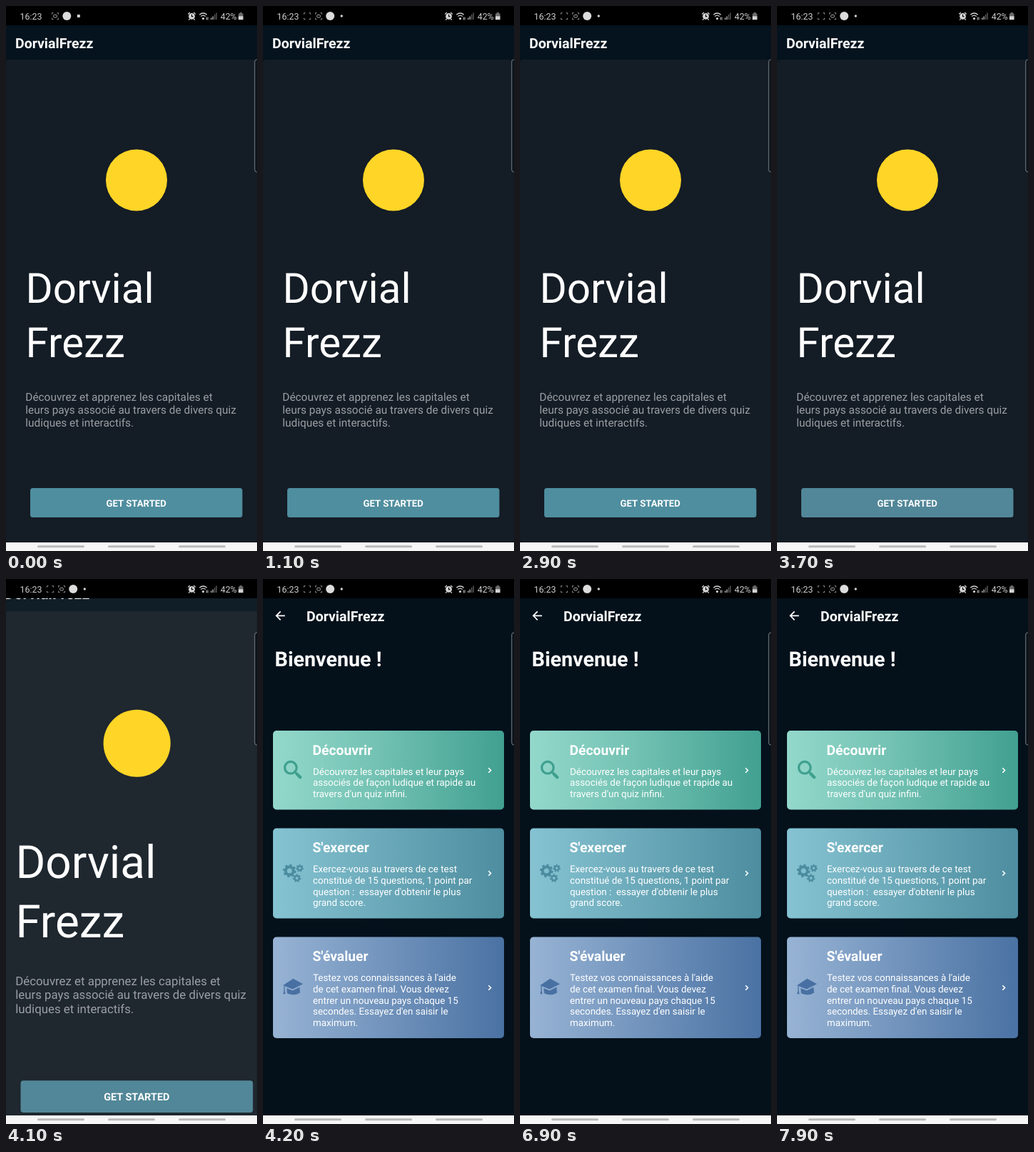
Write an HTML page that moves like this. It is 352 px wide and 762 px high and loops after 8000 ms.

```html
<!DOCTYPE html>
<html lang="fr">
<head>
<meta charset="utf-8">
<title>DorvialFrezz</title>
<style>
  html, body { margin: 0; width: 100%; height: 100%; overflow: hidden; background: #04111b; }
  svg { display: block; width: 100%; height: 100%; }
  text { font-family: Roboto, Arial, sans-serif; fill: #fff; text-rendering: geometricPrecision; }

  .bar { font-size: 19.5px; font-weight: 700; }
  .hero { font-size: 58.3px; }
  .lead { font-size: 15.4px; fill: #9b9fa5; }
  .cta { font-size: 13.2px; font-weight: 700; text-anchor: middle; }
  .hello { font-size: 28.7px; font-weight: 700; }
  .name { font-size: 19.3px; font-weight: 700; }
  .desc { font-size: 13.4px; }
  .clock { font-size: 12.4px; fill: #d0d0d0; }

  .home, .veil, .button, .before, .after { animation: 8s linear infinite; }
  .home { transform-origin: 176px 388px; animation-name: zoom; }
  .veil { opacity: 0; animation-name: veil; }
  .button { fill: #4f8e9f; animation-name: press; }
  .menu { animation: show 8s step-end infinite; }
  .before { animation-name: early; animation-timing-function: step-end; }
  .after { animation-name: late; animation-timing-function: step-end; }

  @keyframes zoom {
    0% { transform: scale(1); }
    48.375% { transform: scale(1); animation-timing-function: cubic-bezier(.35, .45, 0, 1); }
    53.375%, 100% { transform: scale(1.1); }
  }
  @keyframes veil {
    0%, 48.375% { opacity: 0; }
    51.25%, 100% { opacity: .047; }
  }
  @keyframes press {
    0%, 46.2% { fill: #4f8e9f; }
    46.25%, 100% { fill: #518798; }
  }
  @keyframes show { 0% { visibility: hidden; } 52.3%, 100% { visibility: visible; } }
  @keyframes early { 0% { visibility: visible; } 1.25%, 100% { visibility: hidden; } }
  @keyframes late { 0% { visibility: hidden; } 1.25%, 100% { visibility: visible; } }
</style>
</head>
<body>
<svg viewBox="0 0 352 762" preserveAspectRatio="none">
  <defs>
    <linearGradient id="green"><stop stop-color="#93d8cb"/><stop offset=".45" stop-color="#73c2b3"/><stop offset="1" stop-color="#41a091"/></linearGradient>
    <linearGradient id="teal"><stop stop-color="#86c3d2"/><stop offset="1" stop-color="#4d8d9f"/></linearGradient>
    <linearGradient id="blue"><stop stop-color="#97b3d4"/><stop offset="1" stop-color="#4a72a3"/></linearGradient>
    <path id="corners" d="M-4.5-2.5v-2h2M2.5-4.5h2v2M4.5 2.5v2h-2M-2.5 4.5h-2v-2" fill="none" stroke="#8f8f8f"/>
    <g id="capture">
      <use href="#corners"/>
      <rect x="-2.3" y="-1.8" width="4.6" height="3.6" rx=".8" fill="none" stroke="#a8a8a8"/>
    </g>
    <path id="chevron" d="M316.3-3.2l3.2 3.2l-3.2 3.2" fill="none" stroke="#fff" stroke-width="1.6"/>
  </defs>

  <!-- welcome screen -->
  <g class="home">
    <rect y="27" width="352" height="723" fill="#04131d"/>
    <rect y="75" width="352" height="675" rx="4" fill="#141c25"/>
    <rect class="veil" y="27" width="352" height="723" fill="#f0ffff"/>
    <text class="bar" x="13" y="59">DorvialFrezz</text>
    <circle cx="183" cy="243.5" r="43" fill="#ffd527"/>
    <text class="hero" x="27.5" y="415">Dorvial</text>
    <text class="hero" x="27.5" y="491">Frezz</text>
    <text class="lead">
      <tspan x="27.3" y="552.4">Découvrez et apprenez les capitales et</tspan>
      <tspan x="27.3" y="570.2">leurs pays associé au travers de divers quiz</tspan>
      <tspan x="27.3" y="588">ludiques et interactifs.</tspan>
    </text>
    <rect class="button" x="34" y="674" width="297.5" height="41" rx="3.5"/>
    <text class="cta" x="182.7" y="699.7">GET STARTED</text>
  </g>

  <!-- menu screen -->
  <g class="menu">
    <rect y="27" width="352" height="723" fill="#04111b"/>
    <path d="M30.8 51.3H18.8M24.6 45.3l-6 6l6 6" fill="none" stroke="#fff" stroke-width="1.7"/>
    <text class="bar" x="61" y="59">DorvialFrezz</text>
    <text class="hello" x="16.6" y="122">Bienvenue !</text>

    <rect x="14" y="212" width="324" height="110.5" rx="5" fill="url(#green)"/>
    <g fill="none" stroke="#3fa08f">
      <circle cx="38.8" cy="263.7" r="8.3" stroke-width="3.2"/>
      <path d="M45 270l2.5 2.5" stroke-width="2.5"/>
      <path d="M47.5 272.5l4.7 4.7" stroke-width="4.4" stroke-linecap="round"/>
    </g>
    <text class="name" x="69.5" y="245.8">Découvrir</text>
    <text class="desc">
      <tspan x="70" y="273.7">Découvrez les capitales et leur pays</tspan>
      <tspan x="70" y="289.4">associés de façon ludique et rapide au</tspan>
      <tspan x="70" y="305">travers d'un quiz infini.</tspan>
    </text>
    <use href="#chevron" y="267.5"/>

    <rect x="14" y="348.5" width="324" height="126" rx="5" fill="url(#teal)"/>
    <g fill="none" stroke="#4b8c9f">
      <circle cx="37.2" cy="408" r="5.5" stroke-width="4"/>
      <circle cx="37.2" cy="408" r="8" stroke-width="2.6" pathLength="16" stroke-dasharray="1"/>
      <circle cx="51.5" cy="404.3" r="2.9" stroke-width="2.2"/>
      <circle cx="51.5" cy="404.3" r="4.6" stroke-width="1.6" pathLength="14" stroke-dasharray="1"/>
      <circle cx="47.6" cy="418.2" r="3.2" stroke-width="2.4"/>
      <circle cx="47.6" cy="418.2" r="5" stroke-width="1.6" pathLength="14" stroke-dasharray="1"/>
    </g>
    <text class="name" x="69.5" y="382.4">S'exercer</text>
    <text class="desc">
      <tspan x="70" y="410.2">Exercez-vous au travers de ce test</tspan>
      <tspan x="70" y="425.9">constitué de 15 questions, 1 point par</tspan>
      <tspan x="70" y="441.5">question :&nbsp; essayer d'obtenir le plus</tspan>
      <tspan x="70" y="457.2">grand score.</tspan>
    </text>
    <use href="#chevron" y="411.5"/>

    <rect x="14" y="500.5" width="324" height="141.5" rx="5" fill="url(#blue)"/>
    <g fill="#4870a2">
      <path d="M28 568.2L42.3 558.8L56 566.2L41.5 573.5Z"/>
      <path d="M33.3 572.2L41.6 575.6L51.3 570.8L52 578.5Q43.5 583.8 33.8 579.3Z"/>
      <path d="M29.2 569.5h1.3v6.2l1 4.6h-3.2l.9-4.6Z"/>
    </g>
    <text class="name" x="69.5" y="534.3">S'évaluer</text>
    <text class="desc">
      <tspan x="70" y="562.2">Testez vos connaissances à l'aide</tspan>
      <tspan x="70" y="577.9">de cet examen final. Vous devez</tspan>
      <tspan x="70" y="593.5">entrer un nouveau pays chaque 15</tspan>
      <tspan x="70" y="609.2">secondes. Essayez d'en saisir le</tspan>
      <tspan x="70" y="624.8">maximum.</tspan>
    </text>
    <use href="#chevron" y="571.5"/>
  </g>

  <!-- edge handle -->
  <rect x="348.8" y="75" width="8" height="157" rx="3" fill="#0b131b" stroke="#7d8288"/>

  <!-- status bar -->
  <rect width="352" height="27" fill="#000"/>
  <text class="clock" x="19.5" y="18.7">16:23</text>
  <g class="before">
    <use href="#capture" x="69" y="14.2"/>
    <circle cx="85.3" cy="14" r="6" fill="#dcdcdc"/>
    <rect x="99.8" y="12" width="4" height="4" fill="#d0d0d0"/>
  </g>
  <g class="after">
    <use href="#corners" x="62" y="14.2"/>
    <use href="#capture" x="78" y="14.2"/>
    <circle cx="94.2" cy="14" r="6" fill="#dcdcdc"/>
    <circle cx="110.3" cy="14" r="1.7" fill="#d0d0d0"/>
  </g>
  <circle cx="260.5" cy="14.4" r="4.4" fill="#d4d4d4"/>
  <path d="M260.5 11.8v2.8h2" fill="none" stroke="#000" stroke-width="1.1"/>
  <g fill="none" stroke="#d4d4d4" stroke-width="1.3">
    <path d="M255.3 11.4l2.6-2.3M265.7 11.4l-2.6-2.3M257.6 18l-1.4 1.6M263.4 18l1.4 1.6"/>
    <path d="M271.3 12.3q5.2-4.6 10.4 0M273.2 14.6q3.3-2.9 6.6 0"/>
    <path d="M281.2 15.5v4M283 15.5v4" stroke-width=".9"/>
  </g>
  <circle cx="276.5" cy="17.6" r="1.6" fill="#d4d4d4"/>
  <path d="M287.8 19v-2.5M290.2 19v-4.5" stroke="#b0b0b0" stroke-width="1.4"/>
  <path d="M292.6 19v-7M295 19v-9.5" stroke="#5c5c5c" stroke-width="1.4"/>
  <text class="clock" x="300.7" y="18.7">42%</text>
  <path d="M326 10.5h1.7v-1.5h3.2v1.5h1.7v4h-6.6Z" fill="#6b6b6b"/>
  <rect x="326" y="14.2" width="6.6" height="5" fill="#d4d4d4"/>

  <!-- navigation bar -->
  <rect y="750" width="352" height="12" fill="#f6f6f6"/>
  <path d="M45.5 755.7h63M144.5 755.7h63M243.5 755.7h63" stroke="#bababa" stroke-width="3" stroke-linecap="round"/>
</svg>
</body>
</html>
```
